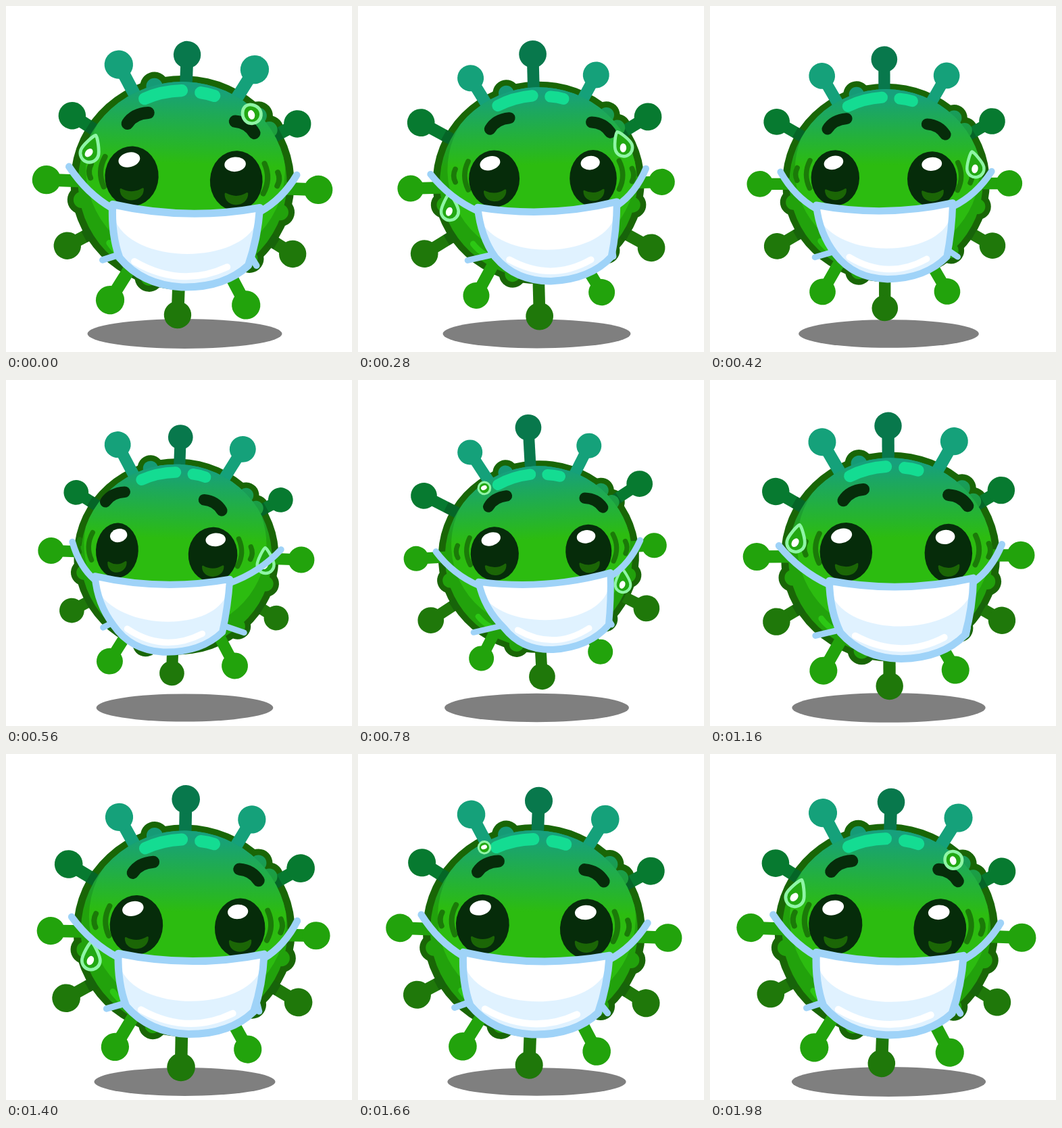
Animation of 512x512 px, one loop 2 s. Source, as an HTML page with a canvas:

```html
<!DOCTYPE html>
<html lang="en">
<head>
<meta charset="utf-8">
<title>Masked germ</title>
<style>
html, body { margin: 0; width: 100%; height: 100%; overflow: hidden; background: #fff; }
canvas { display: block; width: 512px; height: 512px; }
</style>
</head>
<body>
<canvas id="stage" width="512" height="512"></canvas>
<script>
const c = document.getElementById('stage').getContext('2d');
const LOOP = 2000, TAU = Math.PI * 2, RAD = Math.PI / 180, MID_Y = 261.5;
const SPIKES = ['#08784c', '#15a17a', '#077a30', '#22a30c', '#1f780a', '#22a30c', '#1f780a'];
const LUMPS = [15, 47, 107, 168, 252, 316, 326];
const DARK = '#062c0a', SHELL = '#196606', BLUE = '#9fd3f8';

const clamp = v => Math.min(1, Math.max(0, v));
const ease = v => (v = clamp(v)) * v * (3 - 2 * v);

// Breathing and a left-right sway drive every other part of the pose
function poseAt(t) {
  const wave = (n, peak) => Math.cos(TAU * n * (t / LOOP - peak));
  const ramp = (from, to) => ease((t - from) / (to - from));
  const beat = wave(4, 0.025);
  const reach = 191 + 9 * wave(1, 0.83) + 3 * wave(2, 0.08);
  const size = reach / 195.4 - 0.007 + 0.0105 * beat;
  const shrink = 1 - size;
  const sway = ramp(0, 270) - ramp(290, 560) + ramp(570, 780) - ramp(1170, 1650);
  const turn = (1 - sway) * -240 * shrink + sway * (11 - 65 * shrink);
  const rot = 2.1 - sway * (2 + 35 * shrink);
  const cx = 260 + 0.45 * turn;
  const bx = cx + 0.95 * (2.2 - rot);
  return {
    reach, size, turn, rot, cx, bx,
    cy: 261.8 + 4.8 * wave(1, 0.92) + 2.7 * wave(2, 0.17),
    mx: bx + turn * size,
    stretch: (1 + 9.5 * beat) / 2,
    lean: Math.max(0, 260 * shrink),
    bounce: wave(2, 0.03)
  };
}

function within(x, y, deg, k, draw) {
  c.save();
  c.translate(x, y);
  c.rotate(deg * RAD);
  c.scale(k, k);
  draw();
  c.restore();
}

function oval(color, x, y, rx, ry = rx, deg = 0) {
  c.fillStyle = color;
  c.beginPath();
  c.ellipse(x, y, rx, ry, deg * RAD, 0, TAU);
  c.fill();
}

function line(color, width, a, b, d) {
  c.strokeStyle = color;
  c.lineWidth = width;
  c.beginPath();
  c.moveTo(...a);
  if (d) c.quadraticCurveTo(...b, ...d);
  else c.lineTo(...b);
  c.stroke();
}

function fade(top, bottom) {
  const g = c.createLinearGradient(0, -140, 0, -28);
  g.addColorStop(0, top);
  g.addColorStop(1, bottom);
  return g;
}

function spikes(p) {
  const s = p.size;
  c.lineCap = 'butt';
  for (let i = 0; i < 12; i++) {
    const kind = Math.min(i, 12 - i), len = p.reach + (i % 2 ? p.stretch : -p.stretch);
    within(p.cx, p.cy, p.rot + i * 30, 1, () => {
      line(SPIKES[kind], 18.5 * s, [0, -138 * s], [0, -len]);
      if (kind === 2 || kind === 4)
        line('rgba(0,40,10,.25)', 18.5 * s, [0, -138 * s], [0, -163 * s]);
      oval(SPIKES[kind], 0, -len, len * 0.105);
    });
  }
  c.lineCap = 'round';
}

function blob(color, rx, ry, bump) {
  oval(color, 0, 0, rx, ry);
  for (const deg of LUMPS)
    oval(color, 150 * Math.cos(deg * RAD), 147 * Math.sin(deg * RAD), bump);
}

function skin(turn) {
  blob(fade('#159a76', '#22a20c'), 153, 148, 12);
  c.save();
  c.beginPath();
  c.ellipse(0, 0, 153, 148, 0, 0, TAU);
  c.clip();
  oval(fade('#17a07c', '#2cbc10'), 3 + turn * 0.3, -20, 146, 140);
  c.restore();
  line('#14dc92', 18, [-60, -121], [-36, -133], [-6, -135]);
  line('#14dc92', 18, [22, -133], [33, -132], [42, -129]);
  line('#2cc714', 9, [-104, 92], [-97, 102], [-86, 109]);
}

// A bead of sweat swells at the brow, then slides round the rim
function drop(side, age, life) {
  const f = age / life;
  if (f > 1) return;
  const at = (26 + 92 * f) * RAD, tip = clamp((f - 0.14) * 3);
  const size = Math.min(1, 0.4 + 3.2 * f, 10 * (1 - f));
  const tilt = -side * Math.max(0, 70 * (0.75 - f));
  within(side * 143 * Math.sin(at), -143 * Math.cos(at), tilt, size, () => {
    const mid = 6 * tip, top = mid - 13.5 - 14 * tip, k = 7.5 - 5 * tip;
    c.beginPath();
    c.moveTo(0, top);
    c.bezierCurveTo(k, top, 13.5, mid - 7.5, 13.5, mid);
    c.arc(0, mid, 13.5, 0, Math.PI);
    c.bezierCurveTo(-13.5, mid - 7.5, -k, top, 0, top);
    c.fillStyle = '#22a812';
    c.fill();
    c.strokeStyle = '#8ff5a6';
    c.lineWidth = 4.8;
    c.stroke();
    oval('#fff', -1, mid, 5, 7, 22);
  });
}

function eye(side, turn) {
  const n = 1 - Math.max(0, side * turn) * (side < 0 ? 0.0075 : 0.009);
  oval(DARK, 0, 0, 39.3 * n, 44);
  oval('#fff', side - 3 - turn * 0.3, -24, 16 * n, 10.7, side < 0 ? -16 : -7);
  c.fillStyle = c.strokeStyle = '#1b6606';
  c.lineWidth = 3;
  c.beginPath();
  c.moveTo(-15 * n, 20);
  c.quadraticCurveTo(2, 28, 17 * n, 18);
  c.bezierCurveTo(18 * n, 37, -14 * n, 40, -15 * n, 20);
  c.fill();
  c.stroke();
  const d = turn * 0.6 - 1;
  if (side < 0) line(DARK, 18, [d - 10, -77], [d - 1, -92], [d + 20, -94]);
  else line(DARK, 18, [d - 6, -87], [d + 13, -86], [d + 23, -71]);
}

function face(turn) {
  for (const side of [-1, 1]) {
    for (const [x, h] of [[117, 22], [137, 10]])
      line('#1b7a08', 8, [side * x, -5 - h], [side * (x + h / 2), -5], [side * x, -5 + h]);
    within(side * 76.7, 0, 0, 1, () => eye(side, turn));
  }
}

function mask(p) {
  const s = p.size, q = p.lean;
  const place = (ox, oy, deg) => (x, y) => {
    const co = Math.cos(deg * RAD) * s, si = Math.sin(deg * RAD) * s;
    return [ox + x * co - y * si, oy + x * si + y * co];
  };
  const body = place(p.bx, MID_Y, p.rot);
  const m = place(p.mx + 2.5 + p.turn * 0.35, 255.3 + 40.3 * s, p.rot - 0.8);
  for (const side of [-1, 1]) {
    const a = body(side * 167, -17.5), b = m(side * 108, 6);
    line(BLUE, 10.5 * s, a, [(a[0] + b[0]) / 2 + side * 6, (a[1] + b[1]) / 2 + 9], b);
    line(BLUE, 9.5 * s, body(side * 113, 117.5), m(side * 98 + (side < 0 ? q : 0), 74));
  }

  const shape = new Path2D();
  const curve = (a, b) => shape.quadraticCurveTo(...a, ...b);
  shape.moveTo(...m(-108, 0));
  curve(m(0, 22), m(108, 0));
  curve(m(106, 45), m(93 + q * 0.25, 85));
  curve(m(58 + q * 0.3, 119), m(-4 + q * 0.4, 119));
  curve(m(-62 + q * 0.7, 117), m(-96 + q, 78));
  curve(m(-109 + q * 0.3, 45), m(-108, 0));
  shape.closePath();

  c.fillStyle = '#e0f2ff';
  c.fill(shape);
  c.save();
  c.clip(shape);
  c.fillStyle = '#fff';
  c.beginPath();
  c.moveTo(...m(-125, -10));
  c.lineTo(...m(125, -10));
  c.lineTo(...m(104, 22));
  c.bezierCurveTo(...m(78 + q * 0.4, 86), ...m(-82 + q * 0.6, 88), ...m(-106, 18));
  c.fill();
  c.restore();
  line('#fff', 10 * s, m(-74 + q, 83), m(-5 + q * 0.5, 121), m(62 + q * 0.2, 88));
  c.strokeStyle = BLUE;
  c.lineWidth = 11 * s;
  c.stroke(shape);
}

function draw(t) {
  const p = poseAt(t);
  const onBody = part => within(p.bx, MID_Y, p.rot, p.size, part);
  const since = start => (t - start + LOOP) % LOOP;

  c.fillStyle = '#fff';
  c.fillRect(0, 0, 512, 512);
  c.lineCap = c.lineJoin = 'round';
  oval('rgba(0,0,0,.5)', 264.5, 485, 137.7 + 6.8 * p.bounce, 21.3 + 0.7 * p.bounce);
  onBody(() => blob(SHELL, 164, 157, 21));
  spikes(p);
  onBody(() => skin(p.turn));
  within(p.mx, 255.3, p.rot * 0.75 + 0.9, p.size, () => face(p.turn));
  onBody(() => {
    drop(-1, since(700), 800);
    drop(-1, since(1600), 800);
    drop(1, since(1800), 1080);
  });
  mask(p);
}

function tick(now) {
  draw(Math.floor(now % LOOP / 20) * 20);
  requestAnimationFrame(tick);
}
tick(performance.now());
</script>
</body>
</html>
```
